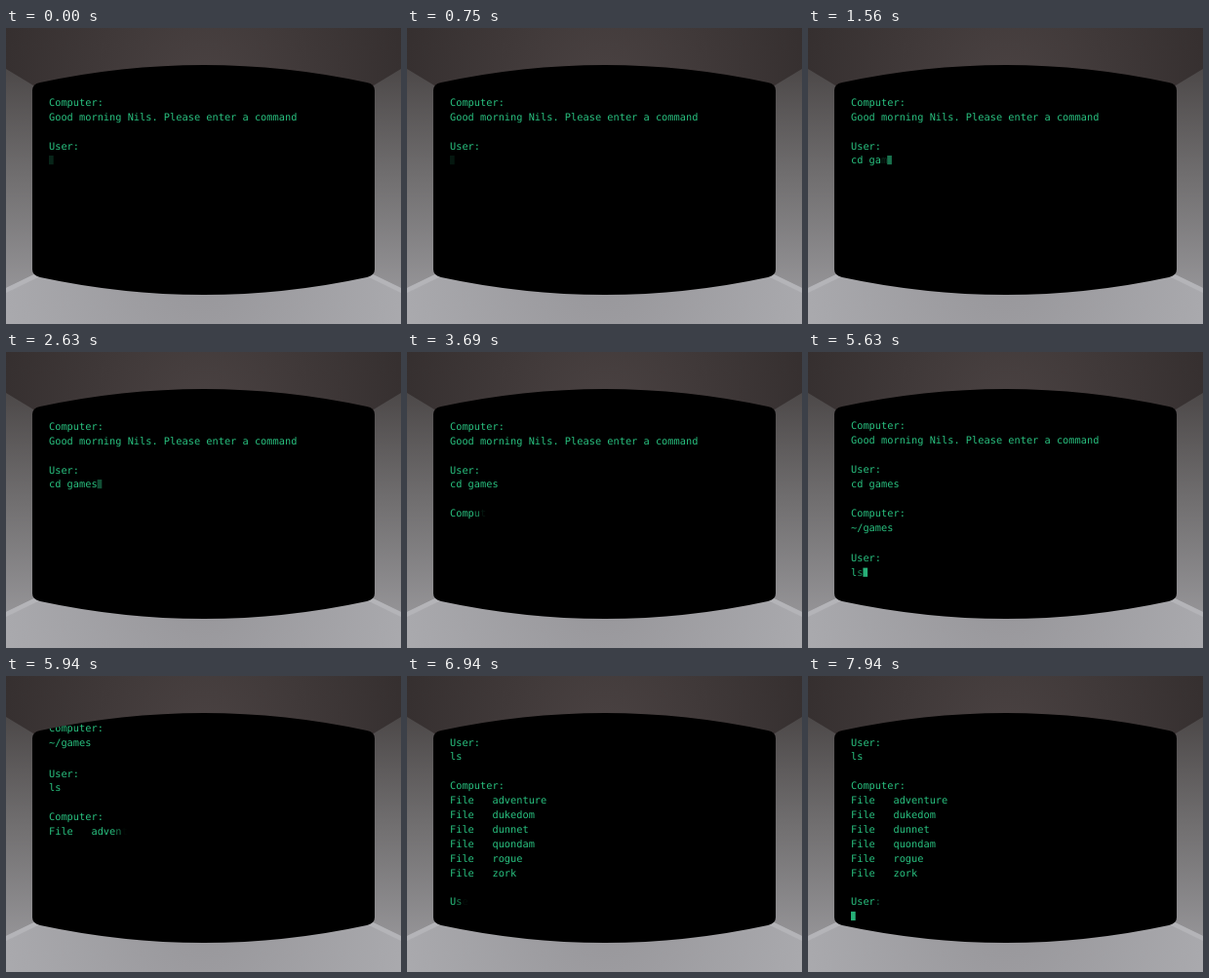
These frames come from a looping animation (405 by 304 pixels, 8000 ms). An HTML page:

```html
<!DOCTYPE html>
<html lang="en">
<head>
<meta charset="utf-8">
<title>Terminal</title>
<style>
  html, body { margin: 0; width: 100%; height: 100%; overflow: hidden; background: #000; }
  svg { display: block; width: 100vw; height: 100vh; }
  text {
    font: 10.3px "DejaVu Sans Mono", "Liberation Mono", monospace;
    text-rendering: geometricPrecision;
    white-space: pre;
    fill: #29c280;
  }
  .cursor { fill: #27b078; }
  #scroll { animation: scroll 8s linear infinite; }
  @keyframes scroll {
    0%, 70.375% { transform: translateY(0); }
    75.375%, 100% { transform: translateY(-144px); }
  }
</style>
</head>
<body>
<svg viewBox="0 0 405 304" preserveAspectRatio="none">
  <defs>
    <radialGradient id="ceiling" gradientUnits="userSpaceOnUse" cx="203" cy="58" r="215">
      <stop offset="0" stop-color="#4a4242"/>
      <stop offset="1" stop-color="#352f2f"/>
    </radialGradient>
    <linearGradient id="wall" x1="0" y1="0" x2="0" y2="1">
      <stop offset="0" stop-color="#4b4747"/>
      <stop offset=".5" stop-color="#716f70"/>
      <stop offset="1" stop-color="#959497"/>
    </linearGradient>
    <radialGradient id="floor" gradientUnits="userSpaceOnUse" cx="203" cy="250" r="215">
      <stop offset="0" stop-color="#97969a"/>
      <stop offset="1" stop-color="#aaaaae"/>
    </radialGradient>
    <path id="screen" d="M35 56Q203 20 370 56Q378 57.5 378 64V248Q378 254 370 256Q203 292 35 256Q27 254 27 248V64Q27 57.5 35 56Z"/>
    <clipPath id="glass"><use href="#screen"/></clipPath>
  </defs>
  <rect y="38" width="405" height="232" fill="url(#wall)"/>
  <path d="M0 0H405V42L372 62H33L0 42Z" fill="url(#ceiling)"/>
  <path d="M0 304V267L33 251H372L405 267V304Z" fill="url(#floor)"/>
  <path d="M0 267L33 251V256L0 272ZM405 267L372 251V256L405 272Z" fill="#b4b4b8"/>
  <use href="#screen"/>
  <g clip-path="url(#glass)"><g id="scroll"></g></g>
</svg>
<script>
const LOOP = 8000, LEFT = 44, CHAR = 6.2, LINE = 14.9;
const OUTPUT = { step: 12.6, fade: 22 };
const TYPED = { step: 150, fade: 80 };
const scroll = document.getElementById('scroll');
const rowY = row => 76 + row * LINE + (row > 7 ? 1.6 : 0);
const clamp = v => Math.max(0, Math.min(1, v));

function add(tag, attrs, parent) {
  const el = document.createElementNS('http://www.w3.org/2000/svg', tag);
  for (const key in attrs) el.setAttribute(key, attrs[key]);
  return parent.appendChild(el);
}

const chars = [];

// Adds a line whose characters appear one by one; returns the end time.
function line(row, text, start, { step, fade } = OUTPUT) {
  const el = add('text', { x: LEFT, y: rowY(row) + 3.8 }, scroll);
  [...text].forEach((c, i) => {
    const span = add('tspan', {}, el);
    span.textContent = c;
    chars.push({ span, from: start + i * step, fade, max: 1 });
  });
  return start + text.length * step;
}

function lines(row, texts, start) {
  for (const text of texts) start = line(row++, text, start);
}

lines(0, ['Computer:', 'Good morning Nils. Please enter a command'], -2000);
line(3, 'User:', -1000);
line(4, 'cd games', 780, TYPED);
lines(6, ['Computer:', '~/games'], 3601);
line(9, 'User:', 4150);
line(10, 'ls', 5410, TYPED);
const games = ['adventure', 'dukedom', 'dunnet', 'quondam', 'rogue', 'zork'];
lines(12, ['Computer:', ...games.map(g => 'File   ' + g)], 5651);
line(20, 'User:', 6890);
chars[chars.length - 1].max = 0.5;

// A cursor moves one cell for each typed character and pulses once a second.
const cursors = [
  { row: 4, from: 0, to: 3595, pulse: -150, typed: 780, count: 8 },
  { row: 10, from: 4300, to: 5640, pulse: 4130, typed: 5410, count: 2 },
  { row: 21, from: 7200, to: LOOP, pulse: 6440, typed: LOOP, count: 0 }
].map(c => ({
  ...c,
  el: add('rect', { class: 'cursor', y: rowY(c.row) - 4.6, width: 4.7, height: 9.2 }, scroll)
}));

function draw(t) {
  for (const c of chars) c.span.style.fillOpacity = c.max * clamp((t - c.from) / c.fade);
  for (const c of cursors) {
    const n = Math.max(0, Math.min(c.count, Math.floor((t - c.typed) / TYPED.step) + 1));
    const glow = (1 - Math.cos((t - c.pulse) * 2 * Math.PI / 1000)) / 2;
    c.el.setAttribute('x', LEFT + n * CHAR);
    c.el.style.opacity = t >= c.from && t < c.to ? glow : 0;
  }
}

// The script shares the clock of the scrolling animation.
const clock = scroll.getAnimations()[0];
function tick() {
  draw((clock.currentTime || 0) % LOOP);
  requestAnimationFrame(tick);
}
tick();
</script>
</body>
</html>
```
